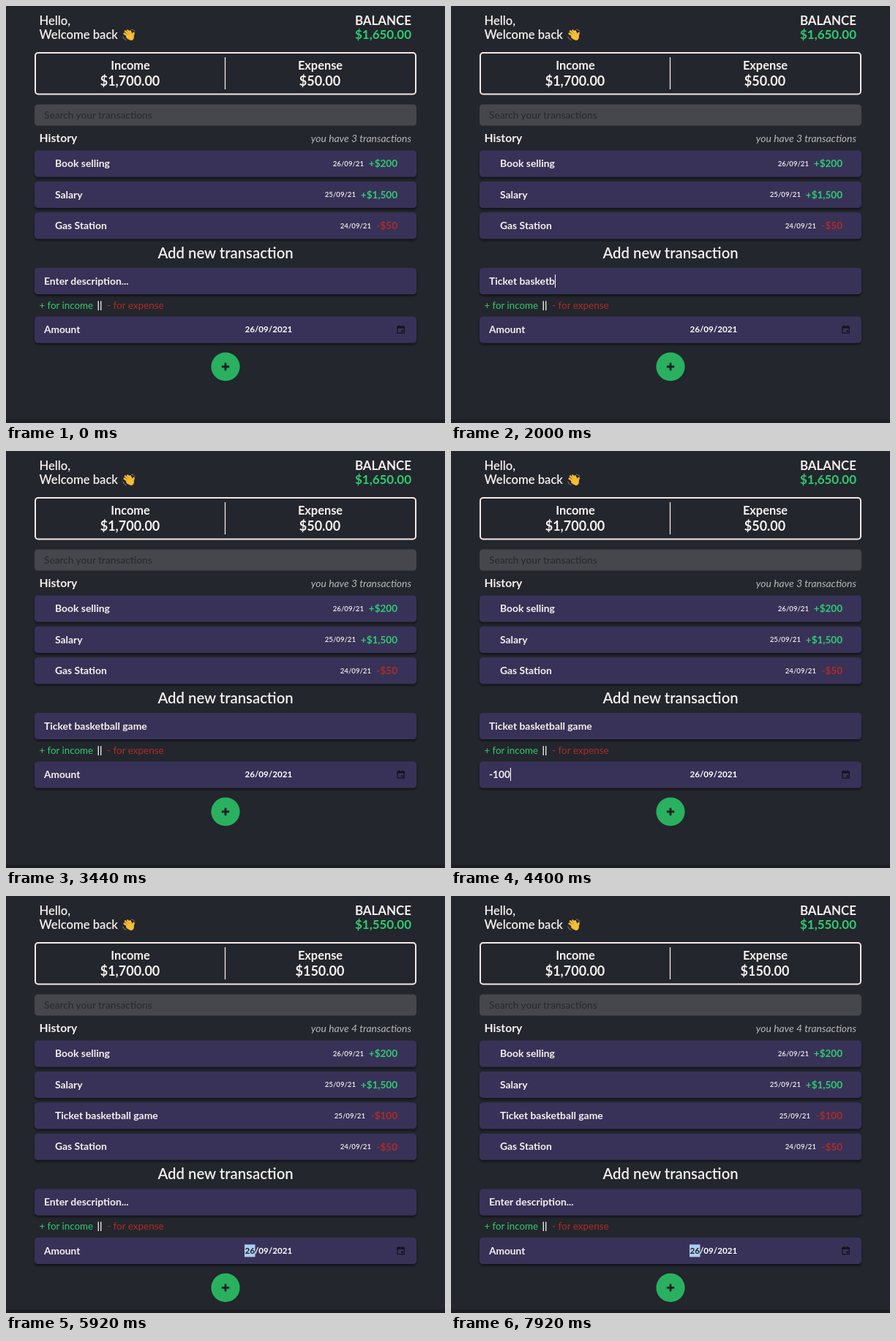
An HTML page that plays this animation: 600x570 px, repeating every 8 s.

```html
<!DOCTYPE html>
<html lang="en">
<head>
<meta charset="utf-8">
<title>Budget tracker</title>
<style>
html, body { margin: 0; width: 100%; height: 100%; overflow: hidden; background: #23262d; }
svg { display: block; width: 600px; height: 570px; }
text { font-family: Lato, "Open Sans", sans-serif; white-space: pre; }
</style>
</head>
<body>
<svg id="stage" viewBox="0 0 600 570" xmlns="http://www.w3.org/2000/svg">
  <defs>
    <filter id="shadow" x="-5%" y="-20%" width="110%" height="160%">
      <feDropShadow dx="0" dy="2.5" stdDeviation="1.6" flood-color="#000" flood-opacity=".5"/>
    </filter>
  </defs>
  <rect width="600" height="570" fill="#23262d"/>
  <rect y="565.5" width="600" height="4.5" fill="#1c1e23"/>
  <g id="wave" fill="none" stroke="#f8bd32" stroke-linecap="round">
    <path d="M168 42L161.6 37.6M169 40L163 34.4M170.5 39L166.3 33.4M172 39L169.6 34.4" stroke-width="2.5"/>
    <path d="M173 42L174.6 37" stroke-width="2.6"/>
    <path d="M168 41.5L171 43" stroke-width="7.6"/>
    <path d="M166.6 39.6L163.7 37M168.7 38L166.2 35.2" stroke="#c98420" stroke-width=".6"/>
    <path d="M159.8 42Q160.6 45.6 164 46.6M171.6 32Q175 32.4 176.2 35" stroke="#9a8a70" stroke-width=".9"/>
  </g>
  <rect x="40" y="64" width="520" height="56.5" rx="4" fill="none" stroke="#f3e8e3" stroke-width="2"/>
  <path d="M299.5 70V114" stroke="#f3e8e3" stroke-width="1.3"/>
  <rect x="39" y="134.5" width="522" height="29" rx="4.5" fill="#46474d"/>
</svg>
<script>
const LOOP = 8000, ROW_STEP = 42.4;
const WHITE = "#f6f0ed", GREEN = "#2ecc71", RED = "#ae2c26", PANEL = "#373058";
const stage = document.getElementById("stage");

function add(parent, tag, attrs, content) {
  const el = document.createElementNS("http://www.w3.org/2000/svg", tag);
  for (const key in attrs) el.setAttribute(key, attrs[key]);
  if (content !== undefined) el.textContent = content;
  parent.appendChild(el);
  return el;
}
function label(parent, content, x, y, size, options = {}) {
  return add(parent, "text", {
    x, y, "font-size": size, fill: WHITE, "font-weight": 700, ...options
  }, content);
}
function group(parent, y = 0) {
  return add(parent, "g", { transform: `translate(0 ${y})` });
}
function panel(parent, y) {
  add(parent, "rect", { x: 39, y, width: 522, height: 36, rx: 4.5, fill: PANEL, filter: "url(#shadow)" });
}
const end = { "text-anchor": "end" }, middle = { "text-anchor": "middle" };
const show = (el, on) => el.setAttribute("visibility", on ? "visible" : "hidden");
function setText(el, value) {
  if (el.textContent !== value) el.textContent = value;
}

// Summary
label(stage, "Hello,", 45.5, 25.5, 16.6, { "font-weight": 600 });
label(stage, "Welcome back", 45.5, 45, 16.6, { "font-weight": 600 });
label(stage, "BALANCE", 554, 25.5, 16.9, end);
const balance = label(stage, "", 554, 45.2, 17, { ...end, fill: GREEN });
label(stage, "Income", 170, 86.5, 16.4, middle);
label(stage, "$1,700.00", 169.5, 109, 18, middle);
label(stage, "Expense", 429.5, 86.5, 16.4, middle);
const expense = label(stage, "", 429, 109, 18, middle);
label(stage, "Search your transactions", 52, 153.7, 13.7, { fill: "#292b31", "font-weight": 500 });
label(stage, "History", 45.5, 186.3, 15.7);
const count = label(stage, "", 554, 185.6, 13.9, {
  ...end, fill: "#b9b6b6", "font-weight": 400, "font-style": "italic"
});

// Transaction list
function row(name, date, dateEnd, amount, index) {
  const g = group(stage, 197.5 + index * ROW_STEP);
  panel(g, 0);
  label(g, name, 67, 22.8, 13.9);
  label(g, date, dateEnd, 21.4, 9.6, { ...end, "font-weight": 600 });
  label(g, amount, 535, 22.9, 13.5, { ...end, fill: amount[0] === "+" ? GREEN : RED });
  return g;
}
row("Book selling", "26/09/21", 489, "+$200", 0);
row("Salary", "25/09/21", 478, "+$1,500", 1);
const ticketRow = row("Ticket basketball game", "25/09/21", 491, "-$100", 2);
const gasRow = row("Gas Station", "24/09/21", 499, "-$50", 2);

// Form
const form = group(stage);
label(form, "Add new transaction", 300, 344.6, 20.3, { ...middle, "font-weight": 600 });
panel(form, 358);
label(form, "+ for income", 45.5, 413.8, 13.3, { fill: GREEN, "font-weight": 400 });
label(form, "||", 124.5, 413.8, 13.4);
label(form, "- for expense", 138, 413.8, 13.5, { fill: RED, "font-weight": 400 });
panel(form, 424.5);

const caret = add(form, "path", { stroke: "#fff", "stroke-width": 1 });
const descriptionText = label(form, "", 52, 381, 13.9);
const amountText = label(form, "", 52, 447.2, 13.7);

const selection = add(form, "rect", { x: 326, y: 434, width: 14.5, height: 17, fill: "#abcdf2" });
const dateText = label(form, "", 326.5, 446.4, 11.6, { fill: "#fff" });
const day = add(dateText, "tspan", {});
add(dateText, "tspan", {}, "/09/2021");

add(form, "path", {
  d: "M535 438.3H544.2V447.2H535ZM537 436.3V438M542.2 436.3V438",
  fill: "none", stroke: "#14131c", "stroke-width": 1.3
});
add(form, "path", { d: "M534.5 437.8H544.7V440.4H534.5ZM540.4 443.2H542.8V445.6H540.4Z", fill: "#14131c" });
add(form, "circle", { cx: 300, cy: 493, r: 19.6, fill: "#29b15f" });
add(form, "path", { d: "M300 487.8V498.2M294.8 493H305.2", stroke: "#1d2227", "stroke-width": 2.8 });

// Each field holds the moment of focus and the moment of every keystroke.
const description = {
  el: descriptionText, top: 367, value: "Ticket basketball game", hint: "Enter description...",
  focus: 400, blur: 3600,
  keys: [560, 640, 720, 880, 960, 1040, 1200, 1280, 1360, 1680, 1760, 1840, 1920, 2000,
    2080, 2160, 2240, 2320, 2400, 2480, 2640, 2720]
};
const amount = {
  el: amountText, top: 433, value: "-100", hint: "Amount",
  focus: 3600, blur: 4720, keys: [3920, 4080, 4240, 4320]
};
const DAY_CHANGED = 5120, CLEARED = 5840, ADDED = 5920;

function updateField(field, t) {
  const typed = t < CLEARED ? field.keys.filter(k => k <= t).length : 0;
  setText(field.el, typed ? field.value.slice(0, typed) : field.hint);
  if (t < field.focus || t >= field.blur) return false;
  const since = t - (typed ? field.keys[typed - 1] : field.focus);
  const x = 52.5 + (typed ? field.el.getComputedTextLength() : 0);
  caret.setAttribute("d", `M${x} ${field.top}v18`);
  return since % 1000 < 500;
}

function render(t) {
  const added = t >= ADDED;
  const shift = added ? ROW_STEP : 0;
  setText(balance, added ? "$1,550.00" : "$1,650.00");
  setText(expense, added ? "$150.00" : "$50.00");
  setText(count, `you have ${added ? 4 : 3} transactions`);
  show(ticketRow, added);
  gasRow.setAttribute("transform", `translate(0 ${197.5 + 2 * ROW_STEP + shift})`);
  form.setAttribute("transform", `translate(0 ${shift})`);

  const carets = [description, amount].map(field => updateField(field, t));
  show(caret, carets.some(Boolean));

  const selected = t >= amount.blur;
  show(selection, selected);
  setText(day, t >= DAY_CHANGED && t < CLEARED ? "25" : "26");
  day.setAttribute("fill", selected ? "#1c1d25" : "#fff");
}

let start;
function tick(now) {
  start ??= now;
  render((now - start) % LOOP);
  requestAnimationFrame(tick);
}
render(0);
requestAnimationFrame(tick);
</script>
</body>
</html>
```
